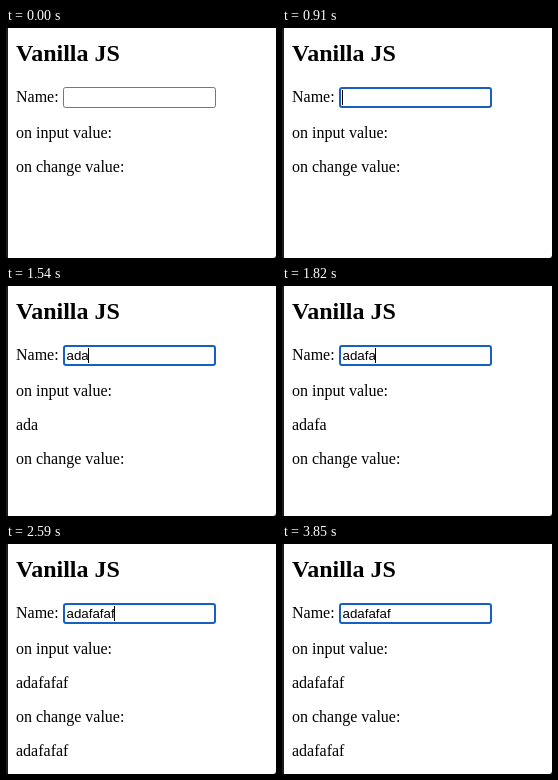
Write an HTML page that moves like this. It is 270 px wide and 230 px high and loops after 4.13 s.

```html
<!DOCTYPE html>
<html lang="en">
<head>
<meta charset="utf-8">
<title>Vanilla JS</title>
<style>
  html, body { margin: 0; width: 100%; height: 100%; overflow: hidden; background: #fff; }
  svg { display: block; width: 270px; height: 230px; }
  text { font: 16px "Liberation Serif", Times, serif; fill: #000; }
  .title { font-size: 24px; font-weight: bold; }
  #typed { font: 13.333px "Liberation Sans", Arial, sans-serif; }
</style>
</head>
<body>
<svg viewBox="0 0 270 230">
  <rect width="270" height="230" fill="#fff"/>
  <rect width="2" height="230" fill="#1c1b1d"/>
  <path d="M270 227.5V230H267.5Q269.5 229.5 270 227.5Z" fill="#333"/>
  <text class="title" x="10" y="33">Vanilla JS</text>
  <text x="10" y="74">Name:</text>
  <rect id="field" fill="#fff"/>
  <text id="typed" x="60.5" y="74"></text>
  <rect id="caret" y="62" width="1" height="15"/>
  <text x="10" y="110">on input value:</text>
  <text id="live" x="10" y="144"></text>
  <text id="label" x="10">on change value:</text>
  <text id="saved" x="10" y="212"></text>
</svg>
<script>
const LOOP = 4130;
const WORD = "adafafaf";
const HOVER = 840, FOCUS = 910, COMMIT = 2590;
const KEYS = [1190, 1400, 1540, 1680, 1820, 1960, 2100, 2240];
const BLINKS = [[2800, 3290], [3850, LOOP]];

const $ = id => document.getElementById(id);
const typed = $("typed"), caret = $("caret"), field = $("field");

function set(el, attrs) {
  for (const name in attrs) el.setAttribute(name, attrs[name]);
}

function drawField(color, weight, radius) {
  const half = weight / 2;
  set(field, {
    x: 57 + half, y: 59 + half, width: 153 - weight, height: 21 - weight,
    rx: radius, stroke: color, "stroke-width": weight
  });
}

function draw(t) {
  const focused = t >= FOCUS;
  const value = WORD.slice(0, KEYS.filter(k => t >= k).length);

  if (focused) drawField("#1660c2", 2, 2);
  else drawField(t >= HOVER ? "#4f4f4f" : "#767676", 1, 2);

  typed.textContent = value;
  $("live").textContent = value;
  $("saved").textContent = t >= COMMIT ? value : "";
  set($("label"), { y: value ? 178 : 144 });

  const hidden = !focused || BLINKS.some(([from, to]) => t >= from && t < to);
  const width = value ? typed.getComputedTextLength() : 0;
  set(caret, { x: Math.floor(60.5 + width), visibility: hidden ? "hidden" : "visible" });
}

const start = performance.now();
function tick() {
  draw((performance.now() - start) % LOOP);
  requestAnimationFrame(tick);
}
tick();
</script>
</body>
</html>
```
